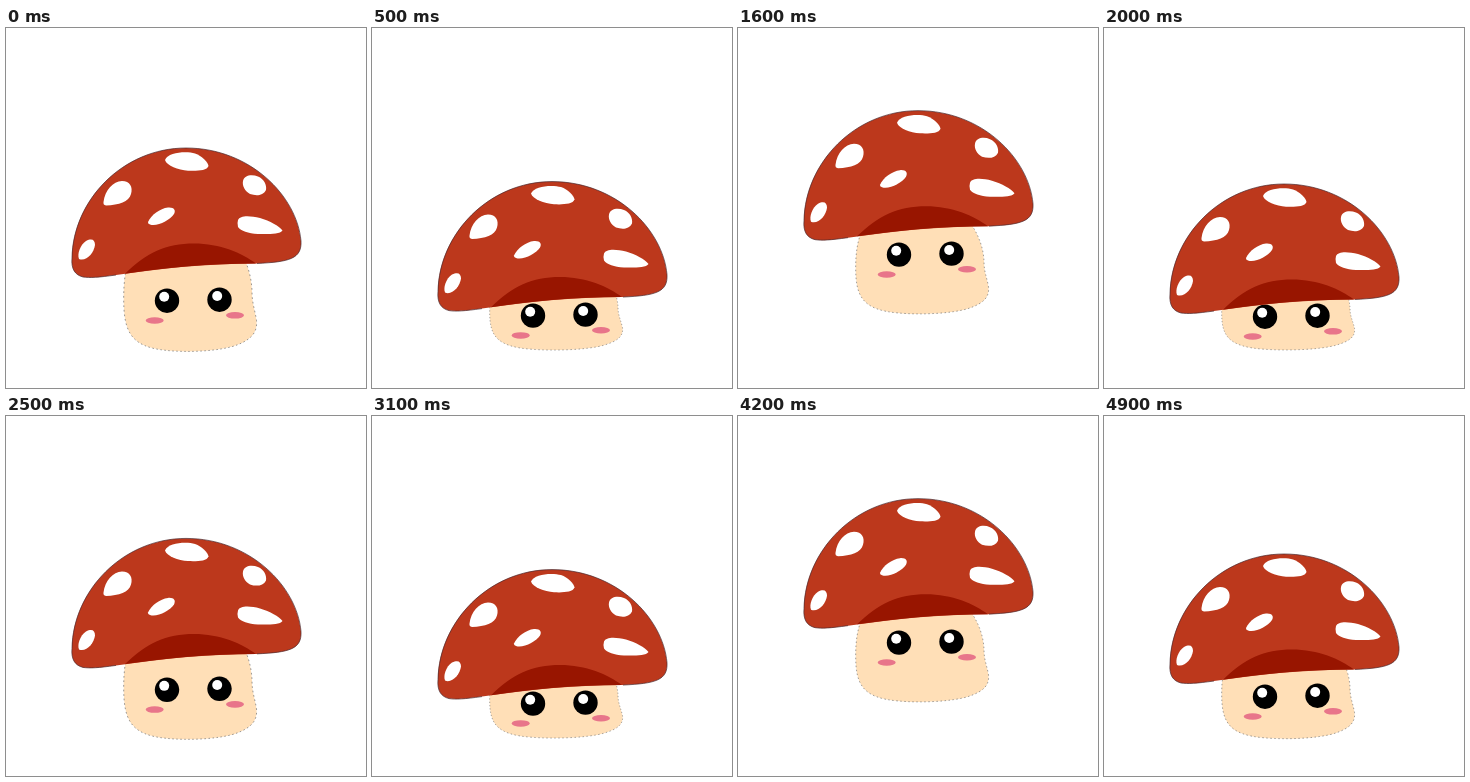
Animation, 360 px wide and 360 px high, one loop 5 s. Source, as an HTML page:

```html
<!DOCTYPE html>
<html lang="en">
<head>
<meta charset="utf-8">
<title>Hopping mushroom</title>
<style>
  html, body { margin: 0; width: 100%; height: 100%; overflow: hidden; background: #fff; }
  svg { display: block; width: 100%; height: 100%; }
</style>
</head>
<body>
<svg viewBox="0 0 360 360">
  <!-- stem: y = 0 is the ground line -->
  <path id="stem" fill="#ffdfb7" stroke="#777" stroke-width=".7" stroke-dasharray="1.5 2.5"
    d="M146 -106 C125 -95 117.7 -76 117.7 -46 C117.7 -18 124 -4 160 -1
    C180 1 215 0 232 -6 C246 -11 251.5 -17 250.5 -27 C249 -36 246 -42 246 -52 C245.5 -68 239 -86 220 -106Z"/>
  <!-- face: y = 0 is the eye line -->
  <g id="face">
    <circle cx="161" cy=".7" r="12.2"/>
    <circle cx="213.5" cy="-.3" r="12.2"/>
    <g fill="#fff">
      <circle cx="158.2" cy="-3.2" r="5"/>
      <circle cx="211.2" cy="-4" r="5"/>
    </g>
    <g fill="#e8758a">
      <ellipse cx="148.7" cy="20.5" rx="9" ry="3.3"/>
      <ellipse cx="229" cy="15.3" rx="9" ry="3.3"/>
    </g>
  </g>
  <!-- cap: y = 0 is its top; the dash leaves the underside without an outline -->
  <g id="cap">
    <path fill="#bc381c" stroke="#4a2a30" stroke-width=".7" stroke-dasharray="450 300"
      d="M110 127 C92 129.5 84 130 77 129 C69 127 65 121 66 110 C67 52 117 0 180 0
      C244 0 291 48 295 93 C296 111 283 114 250 115.5 C200 115.5 155 120.5 110 127Z"/>
    <path fill="#981500" d="M119 125.7 C140 105 160 95.5 188 95.5 C214 95.5 236 105 250 115.5 C203 115.5 161 119.6 119 125.7Z"/>
    <g fill="#fff">
      <path d="M159 12 C162 4 181 3 189 5.5 C196 8 202 14 202.5 18 C201 23 190 23 182 22.7 C172 22 161 18 159 12Z"/>
      <path d="M97.5 54 C99 42 107 33.5 116 33 C124 33 127 39 125 46 C123 54 113 57 100 57.5 Q97 57 97.5 54Z"/>
      <path d="M237 33 C238 27 246 26 252 28.5 C258 31 261 37 260 42 C257 48 250 48 244 46 C239 43 236 38 237 33Z"/>
      <path d="M142 74 C145 67 154 60.5 162 59.5 C168 59 170 62 168 66 C164 72 151 79 144 76.5 Q141.5 75.5 142 74Z"/>
      <path d="M232 72 C234 67 244 67.5 254 70 C264 73 273 78 276.5 82.5 C274 86.5 262 86 252 86 C242 85.5 235 83 232 79 Q231 75 232 72Z"/>
      <path d="M73 111 C71 106 74 97 80 93 C86 90 89 92 89 97 C88 105 80 114 73 111Z"/>
    </g>
  </g>
</svg>
<script>
  const LOOP = 5000, STEP = 100, PERIOD = 2600, CROUCH = 600, APEX = 1300;
  const stem = document.getElementById('stem');
  const face = document.getElementById('face');
  const cap = document.getElementById('cap');

  // Key poses: standing, crouched, top of the jump
  const keys = {
    cap: [120, 156, 36],
    face: [272, 288, 186.5],
    ground: [323.5, 322, 263],
    stretch: [1.15, 0.8, 1.13]
  };

  const ease = u => (1 - Math.cos(Math.PI * u)) / 2;

  function pose([stand, crouch, top], t) {
    return t < CROUCH
      ? stand + (crouch - stand) * ease(t / CROUCH)
      : crouch + (top - crouch) * ease((t - CROUCH) / (APEX - CROUCH));
  }

  function lift(el, y, scale = 1) {
    el.setAttribute('transform', `translate(0 ${y.toFixed(2)}) scale(1 ${scale.toFixed(4)})`);
  }

  function draw(ms) {
    const stepped = Math.floor((ms % LOOP) / STEP) * STEP;
    const phase = stepped % PERIOD;
    const t = Math.min(phase, PERIOD - phase); // the fall mirrors the rise
    lift(stem, pose(keys.ground, t), pose(keys.stretch, t));
    lift(face, pose(keys.face, t));
    lift(cap, pose(keys.cap, t));
  }

  const start = performance.now();
  function tick() {
    draw(performance.now() - start);
    requestAnimationFrame(tick);
  }
  tick();
</script>
</body>
</html>
```
